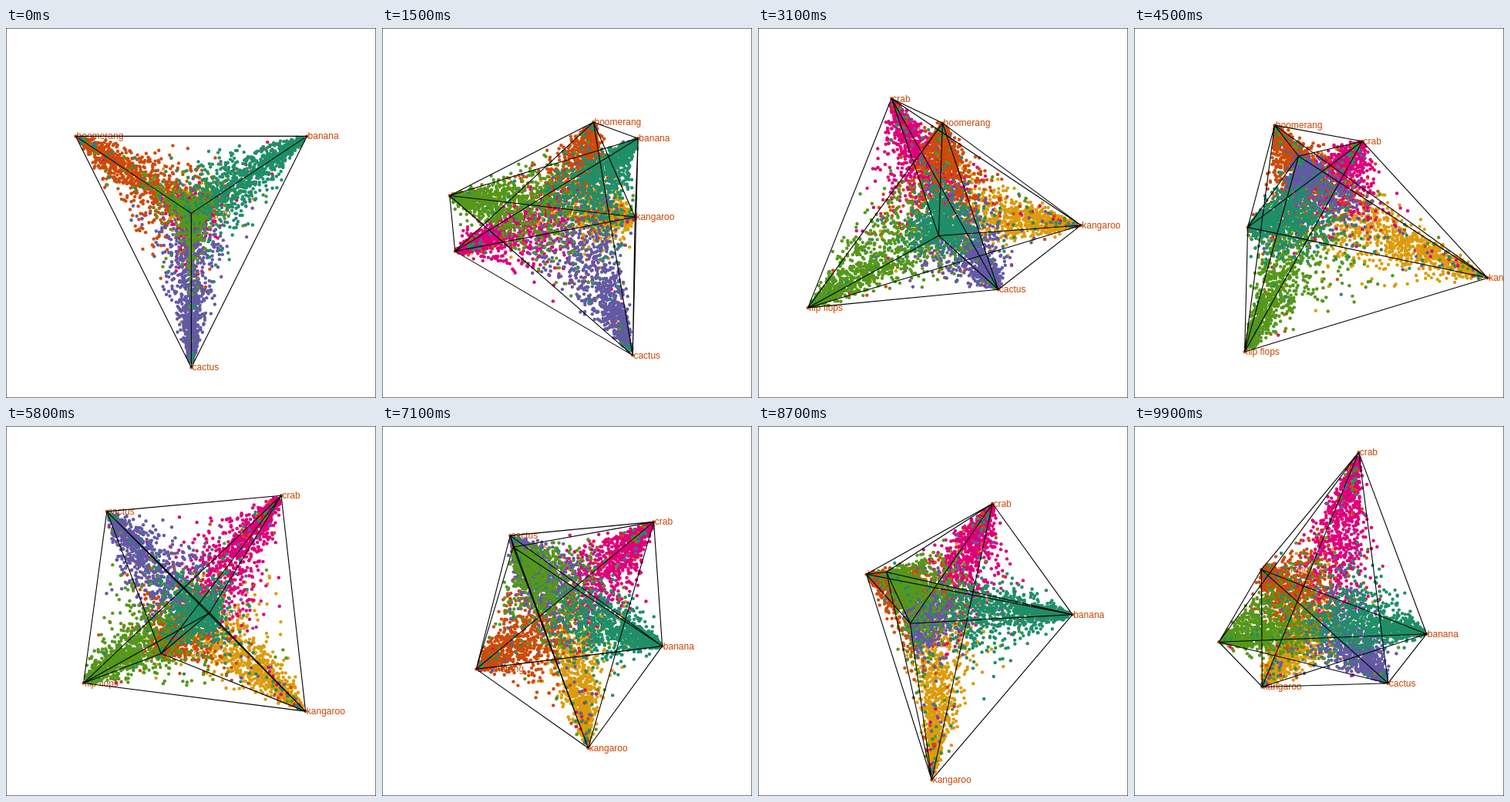
Write an HTML page with a canvas that moves like this. It is 480 px wide and 480 px high and loops after 10 s.

```html
<!DOCTYPE html>
<html lang="en">
<head>
<meta charset="utf-8">
<title>Simplex tour</title>
<style>
html, body { margin: 0; width: 100%; height: 100%; overflow: hidden; background: #fff; }
canvas { display: block; }
</style>
</head>
<body>
<canvas id="stage" width="480" height="480"></canvas>
<script>
const ctx = document.getElementById('stage').getContext('2d');
const SIZE = 480, MID = 240.4, SPAN = 300, LOOP = 10000, STEP = 100, POINTS = 6000;

// Layer is the painting order, spread how widely the doubt is shared out.
const classes = [
  { name: 'boomerang', color: '#cc4c0a', layer: 2, spread: 1 },
  { name: 'banana', color: '#1f8f68', layer: 5, spread: 0.9 },
  { name: 'cactus', color: '#635aa4', layer: 3, spread: 0.9 },
  { name: 'crab', color: '#de0079', layer: 1, spread: 0.9 },
  { name: 'flip flops', color: '#55981a', layer: 4, spread: 1.1 },
  { name: 'kangaroo', color: '#dc9c0b', layer: 0, spread: 0.8 }
];

const dot = (a, b) => a.reduce((sum, v, i) => sum + v * b[i], 0);
const mix = (a, p, b, q) => a.map((v, i) => v * p + b[i] * q);
const unit = a => a.map(v => v / Math.sqrt(dot(a, a)));
const turn = ([x, y], angle) => {
  const c = Math.cos(angle), s = Math.sin(angle);
  return [mix(x, c, y, s), mix(y, c, x, -s)];
};

// Corner coordinates along one screen axis -> direction in five dimensions.
function axisOf(coords) {
  let sum = 0;
  return coords.slice(1).map((v, i) => {
    sum += coords[i];
    return (v - sum / (i + 1)) / SPAN;
  });
}

// Direction in five dimensions -> corner coordinates along one screen axis.
const cornersOf = axis => classes.map((_, i) => axis.reduce((sum, v, j) =>
  sum + v * SPAN * (i <= j ? -1 : i === j + 1 ? j + 1 : 0) / (j + 2), 0));

// Key plane from the first five corners; the sixth balances them around the centre.
function key(time, ...coords) {
  const [x, y] = coords.map(c => axisOf([...c, -c.reduce((a, b) => a + b)])).map(unit);
  return { time, plane: [x, unit(mix(y, 1, x, -dot(x, y)))] };
}

const keys = [
  key(0, [-150, 150, 0, 0, 0], [-100, -100, 200, 0, 0]),
  key(1500, [34, 92, 85, -146, -153], [-118, -97, 184, 49, -23]),
  key(3100, [-1, -6, 71, -67, -175], [-117, 29, 99, -149, 122]),
  key(4500, [-58, -93, -27, 56, -97], [-114, 18, -74, -93, 179]),
  key(5500, [-23, -3, -120, 106, -125], [34, 8, -140, -139, 120]),
  key(7100, [-118, 123, -74, 112, -70], [75, 45, -98, -116, -83]),
  key(8700, [-100, 168, -43, 64, -74], [-47, 3, 16, -139, -50]),
  key(9900, [-75, 139, 89, 51, -130], [-54, 29, 93, -206, 40])
];

function slerp(a, b, t) {
  const angle = Math.acos(Math.max(-1, Math.min(1, dot(a, b))));
  if (angle < 1e-4) return a;
  return mix(a, Math.sin((1 - t) * angle) / Math.sin(angle), b, Math.sin(t * angle) / Math.sin(angle));
}

// Geodesic between two planes along their principal directions.
function between(a, b, t) {
  const [m, n, o, p] = [dot(a[0], b[0]), dot(a[0], b[1]), dot(a[1], b[0]), dot(a[1], b[1])];
  const sum = Math.atan2(o + n, m - p), diff = Math.atan2(o - n, m + p);
  const from = (sum + diff) / 2, to = (sum - diff) / 2;
  const u = turn(a, from), v = turn(b, to);
  return turn([slerp(u[0], v[0], t), slerp(u[1], v[1], t)], -(from + (to - from) * t));
}

function planeAt(time) {
  let i = 0;
  while (i < keys.length - 2 && keys[i + 1].time <= time) i++;
  const a = keys[i], b = keys[i + 1];
  return between(a.plane, b.plane, (time - a.time) / (b.time - a.time));
}

let seed = 20;
function random() {
  seed = (seed + 0x6D2B79F5) | 0;
  let t = Math.imul(seed ^ (seed >>> 15), 1 | seed);
  t = (t + Math.imul(t ^ (t >>> 7), 61 | t)) ^ t;
  return ((t ^ (t >>> 14)) >>> 0) / 4294967296;
}
const normal = () => Math.sqrt(-2 * Math.log(1 - random())) * Math.cos(2 * Math.PI * random());

// Each point is a prediction: one favoured corner, the doubt shared by the others.
function makePoint(_, i) {
  const own = i % classes.length, { color, layer, spread } = classes[own];
  const top = random() < 0.07 ? Math.floor(random() * classes.length) : own;
  const doubt = 0.03 + 0.73 * random() ** 1.3;
  const shares = classes.map((_, k) => k === top ? 0 : Math.exp(spread * normal()));
  const total = shares.reduce((a, b) => a + b);
  const w = shares.map((v, k) => k === top ? 1 - doubt : doubt * v / total);
  return { color, w, depth: layer + 1.5 * random() };
}
const points = Array.from({ length: POINTS }, makePoint).sort((a, b) => a.depth - b.depth);

function disc(x, y, color) {
  ctx.fillStyle = color;
  ctx.beginPath();
  ctx.arc(x, y, 2.2, 0, 2 * Math.PI);
  ctx.fill();
}

function draw(time) {
  const [xs, ys] = planeAt(time).map(axis => cornersOf(axis).map(v => v + MID));
  ctx.fillStyle = '#fff';
  ctx.fillRect(0, 0, SIZE, SIZE);

  ctx.font = '12px "Liberation Sans", Arial, sans-serif';
  ctx.fillStyle = '#cc4400';
  classes.forEach(({ name }, i) => ctx.fillText(name, xs[i] + 1.2, ys[i] + 4));

  for (const p of points) disc(dot(p.w, xs), dot(p.w, ys), p.color);
  xs.forEach((x, i) => disc(x, ys[i], classes[0].color));

  ctx.strokeStyle = '#000';
  ctx.lineWidth = 1.1;
  ctx.beginPath();
  for (let i = 0; i < xs.length; i++) {
    for (let j = 0; j < i; j++) {
      ctx.moveTo(xs[i], ys[i]);
      ctx.lineTo(xs[j], ys[j]);
    }
  }
  ctx.stroke();

  ctx.lineWidth = 1;
  ctx.strokeRect(0, 0, SIZE, SIZE);
}

let shown = -1;
function tick() {
  const time = Math.floor(performance.now() % LOOP / STEP) * STEP;
  if (time !== shown) draw(shown = time);
  requestAnimationFrame(tick);
}
tick();
</script>
</body>
</html>
```
